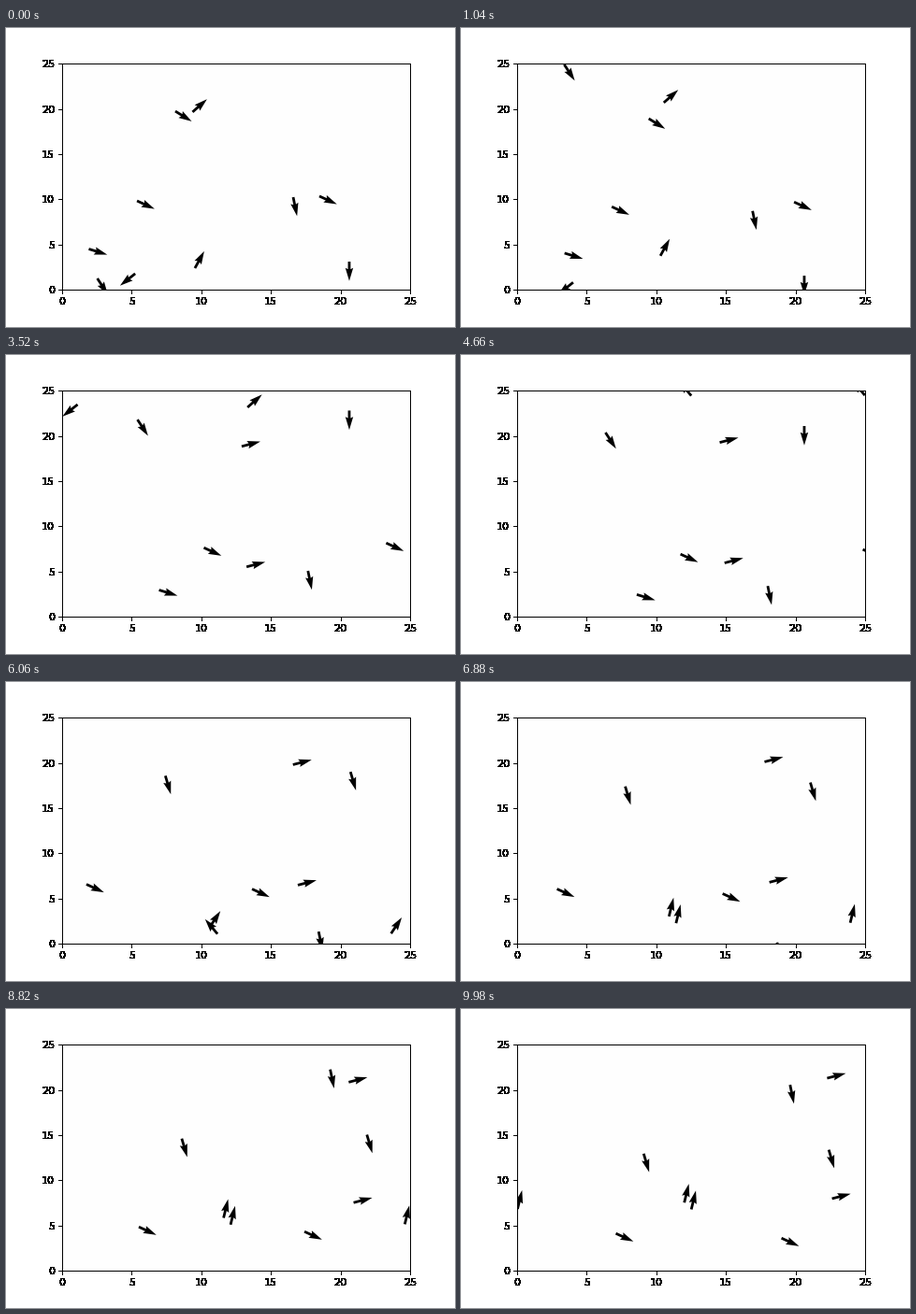
These frames come from a looping animation (480x320 px, 10000 ms). A matplotlib script:

```python
import numpy as np
import matplotlib.pyplot as plt
from matplotlib.animation import FuncAnimation

SIZE = 25
SPEED = 0.03
RADIUS = 0.91
FRAMES = 500

# Starting x, y and heading in degrees of each bird
START = [
    (8.13, 19.76, -31.8), (9.54, 2.38, 61.2),
    (9.37, 19.67, 41.6), (5.25, 1.77, 218.4),
    (1.915, 4.50, -17.1), (2.53, 1.24, -56.9),
    (20.63, 3.10, -90), (16.60, 10.24, -78.4),
    (5.38, 9.83, -24.6), (18.48, 10.35, -24.6),
]


def align(pos, heading):
    """Average every bird's heading with those of its neighbours."""
    gap = np.abs(pos[:, None] - pos)
    # Birds half a box apart also count as close
    gap = np.where(gap > SIZE / 2, gap - SIZE / 2, gap)
    near = np.hypot(gap[..., 0], gap[..., 1]) < RADIUS
    total = near @ heading
    return total / np.linalg.norm(total, axis=1, keepdims=True)


def simulate():
    x, y, deg = np.transpose(START)
    angle = np.radians(deg)
    pos = np.column_stack([x, y])
    heading = np.column_stack([np.cos(angle), np.sin(angle)])
    states = []
    for _ in range(FRAMES):
        heading = align(pos, heading)
        states.append((pos, heading))
        pos = (pos + SPEED * heading) % SIZE
    return states


def harden(image, dpi):
    """Turn every touched pixel solid black."""
    solid = np.zeros_like(image)
    solid[..., 3] = image[..., 3] > 0
    return solid, 0, 0


plt.rcParams.update({
    "font.family": "DejaVu Sans",
    "font.size": 10,
    "text.kerning_factor": 6,
    "axes.linewidth": 0.9,
})
fig = plt.figure(figsize=(6, 4), dpi=80, facecolor="white")
fig.subplots_adjust(left=0.125, right=0.9, bottom=0.125, top=0.88)
ax = fig.add_subplot(facecolor="#fefefe")
ticks = range(0, SIZE + 1, 5)
ax.set(xlim=(0, SIZE), ylim=(0, SIZE), xticks=ticks, yticks=ticks)
for axis in (ax.xaxis, ax.yaxis):
    axis.set_agg_filter(harden)

states = simulate()
first_pos, first_heading = states[0]
flock = ax.quiver(*first_pos.T, *first_heading.T)


def update(step):
    pos, heading = states[step]
    flock.set_offsets(pos)
    flock.set_UVC(*heading.T)
    return (flock,)


anim = FuncAnimation(fig, update, frames=FRAMES, interval=20,
                     repeat=True, repeat_delay=0)
plt.show()
```
